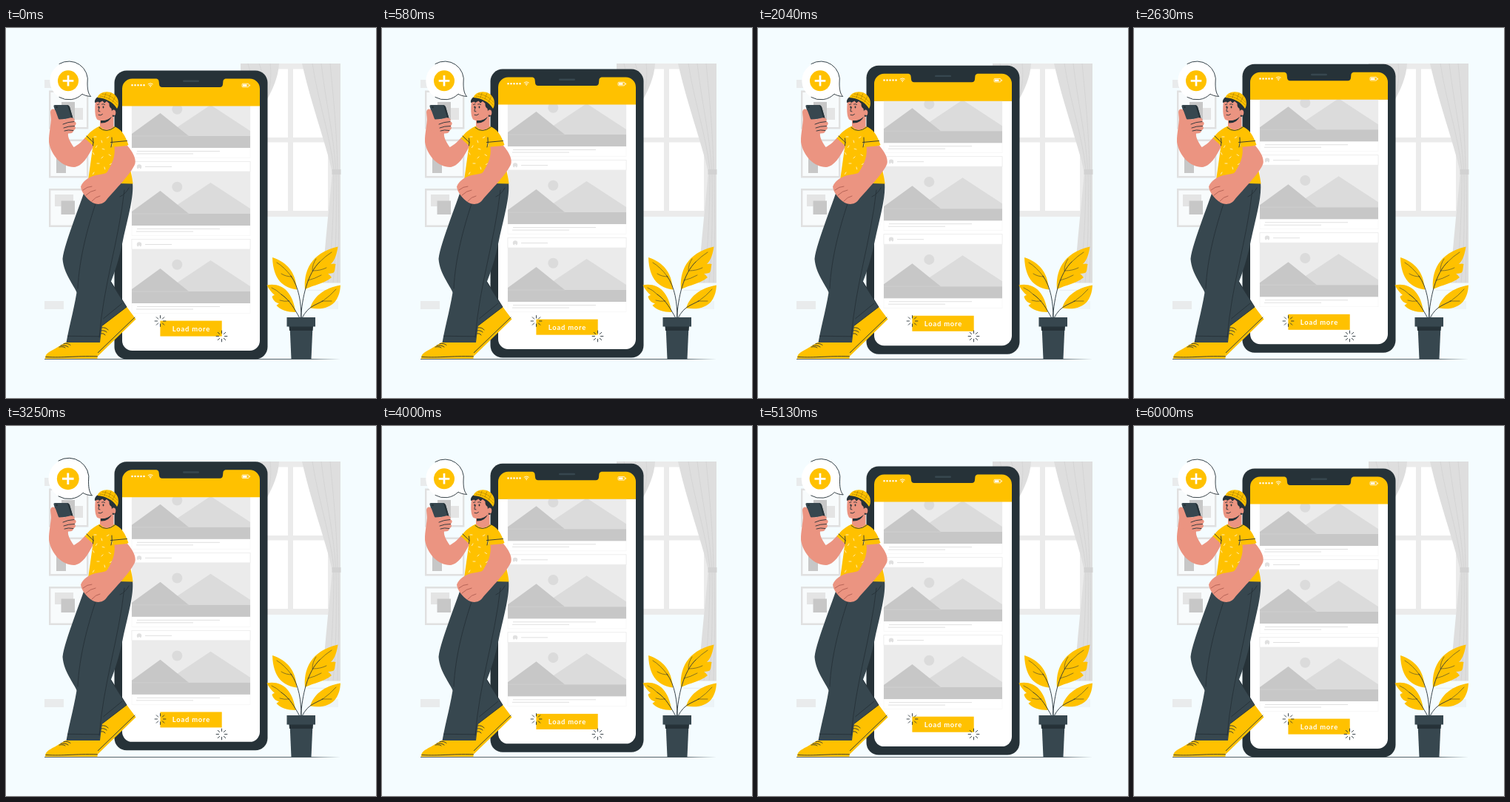
Animation, 500 px wide and 500 px high, one loop 6040 ms. Source, as an HTML page:

```html
<!DOCTYPE html>
<html lang="en">
<head>
<meta charset="utf-8">
<title>Load more</title>
<style>
  html, body { margin: 0; width: 100%; height: 100%; overflow: hidden; background: #f4fcff; }
  svg { display: block; width: 100vw; height: 100vh; }
  .line { fill: none; stroke: #263238; stroke-width: .9; stroke-linecap: round; stroke-linejoin: round; }
  .thin { stroke-width: .55; }
  .skin { fill: #eb9481; }
  .yellow { fill: #ffc100; }
  .slate { fill: #37474f; }
  .dark { fill: #263238; }
  .label { font: 700 9.4px Lato, "Open Sans", sans-serif; letter-spacing: .8px; fill: #fff; text-anchor: middle; }
</style>
</head>
<body>
<svg viewBox="0 0 500 500" xmlns="http://www.w3.org/2000/svg">
  <defs>
    <clipPath id="feedClip"><rect x="157" y="105" width="186" height="331"/></clipPath>
    <g id="post">
      <rect x="170" y="-13.5" width="160" height="100" fill="#fff" stroke="#f5f5f5" stroke-width=".7"/>
      <rect x="170" y="-13.5" width="160" height="13.5" fill="#fff" stroke="#ebebeb" stroke-width=".8"/>
      <circle cx="180" cy="-6.5" r="3.2" fill="#e0e0e0"/>
      <path d="M178.3-3.2q1.7-4 3.4 0z" fill="#fff"/>
      <path d="M188-6.5h36M177 77.5h112M176 81h77" stroke="#e0e0e0"/>
      <rect x="170" width="160" height="73" fill="#ebebeb"/>
      <circle cx="231.3" cy="20.7" r="7" fill="#dbdbdb"/>
      <path d="M224 57V50L276.5 15 330 50V57z" fill="#dbdbdb"/>
      <path d="M170 54L208.500 26 247 57H330V73H170z" fill="#c7c7c7"/>
      <path d="M170 57h77" stroke="#d2d2d2" stroke-width=".7"/>
    </g>
  </defs>

  <!-- Room -->
  <g>
    <path d="M52 70h14v11H52zM52 369h26v11H52z" fill="#e9ebec"/>
    <path d="M416 369h33v11h-33z" fill="#edf4f7"/>
    <path d="M408 354.300h27" stroke="#e6ecef"/>
    <path d="M59.200 85.700h51v49.500h-51zM59.200 151.700h51v49.500h-51zM59.200 218.200h51v49.500h-51z" fill="#f8fbfc" stroke="#e0e0e0" stroke-width="2.400"/>
    <path d="M89 108h15v16H89zM66 225h25v16H66zM80 165h12v15H80z" fill="#e4e4e4"/>
    <path d="M75 100h18v24H75zM68 165h13v31H68zM74.500 233.500H93V252H74.500z" fill="#c7c7c7"/>

    <path d="M317 48h135v8H441V255H317z" fill="#ebebeb"/>
    <path d="M340 55.500h41V148H340zM388 55.500h47V148H388zM340 154.500h41V247H340zM388 154.500h47V247H388z" fill="#fff"/>
    <path d="M317 48h52C368 66 361 82 351 100L317 130z" fill="#dedede"/>
    <path d="M327 48C333 70 336 90 335 115M342 48C349 66 350 84 347 108M357 48Q360 70 353 94" fill="none" stroke="#d2d2d2" stroke-width=".7"/>
    <path d="M400 48h52V344.500H428C430 300 437 240 441 195 432 155 413 105 400 48z" fill="#dedede"/>
    <path d="M414 48C422 100 438 145 443 191M426 48C432 100 443 145 445.500 191M438 48C443 100 447 140 448 191M443 198C443 250 440 305 435 344M446 198C447 250 446 305 442 344M449 198Q451 270 448 344" fill="none" stroke="#d0d0d0" stroke-width=".7"/>
    <rect x="440.500" y="191" width="12" height="7" fill="#d2d2d2"/>
  </g>
  <path d="M52 447.200H410L452 447.500 410 447.900H52z" class="dark"/>

  <!-- Phone -->
  <g id="phone">
    <rect x="146.500" y="57.500" width="207" height="390" rx="16.500" class="dark"/>
    <path d="M157 105H343V422.500A13.500 13.500 0 0 1 329.500 436H170.500A13.500 13.500 0 0 1 157 422.500z" fill="#fff"/>
    <g clip-path="url(#feedClip)">
      <use href="#post" y="89"/><use href="#post" y="194"/><use href="#post" y="299"/>
    </g>
    <path class="yellow" d="M157 105.500V82A13.500 13.500 0 0 1 170.500 68.500H202C205.500 68.500 206.500 70 206.700 73L207 76Q207.300 80 211 80H289Q292.700 80 293 76L293.300 73C293.500 70 294.500 68.500 298 68.500H329.500A13.500 13.500 0 0 1 343 82V105.500z"/>
    <rect x="239" y="70.500" width="22" height="2.400" rx="1.200" fill="#37474f"/>
    <path d="M170.500 77.200h17" stroke="#fff" stroke-width="2.500" stroke-linecap="round" stroke-dasharray="0 4"/>
    <path d="M191.800 76q3.400-2.600 6.800 0M193.200 77.600q2-1.500 4 0" fill="none" stroke="#fff" stroke-width=".9"/>
    <circle cx="195.200" cy="79" r=".8" fill="#fff"/>
    <rect x="319" y="75.200" width="9" height="4.600" rx="1" fill="none" stroke="#fff" stroke-width=".8"/>
    <path d="M320 76.200h5.500v2.600H320zM328.800 76.500h1v2h-1z" fill="#fff"/>
    <rect x="208.400" y="395.600" width="83.300" height="21" class="yellow"/>
    <text x="250.400" y="409.600" class="label">Load more</text>
  </g>
  <path id="bursts" class="line"/>

  <!-- Plant -->
  <g>
    <path class="yellow" d="M404 353C402 330 411 304 448.500 295.500 447 305 445 313 439 319Q443 318 445.500 319C444 326 445 329 442 331Q438 332 435 332 438 334 440 337C431 345 417 347 404 353z"/>
    <path class="yellow" d="M360 310C380 317 391 329 393 353.500 375 351 361 341 360 310z"/>
    <path class="yellow" d="M352.500 347.500C372 344 387 355 391.500 384 380 384 371 381 365.500 375Q367 373 369 372.500C364 371 361 368 359.500 363Q361 361 363 361 357 356 352.500 347.500z"/>
    <path class="yellow" d="M411 378.500C416 362 431 351 452 347.500 451 368 440 383 411 378.500z"/>
    <path class="line" d="M399 392C399 372 396 350 385 335M398.500 392C400 365 407 332 424 316M397 392C390 380 384 368 372 360M400 392Q406 380 416 375L428 369"/>
    <path class="line thin" d="M385 335Q376 323 366 317M424 316Q432 308 440 303M372 360Q366 354 359 351M428 369Q438 362 446 353M408 341Q417 339 426 334M415 328Q425 328 433 324M414 328Q414 319 419 312M386 336Q378 336 372 332M383 369Q376 370 370 368M427 369L440 369"/>
    <path d="M383.500 402h31l-2 45.500h-27z" class="slate"/>
    <path d="M382.500 403h32.500l-.5 6H383z" class="dark"/>
    <path d="M379.500 391H418v12.500H379.500z" class="slate"/>
  </g>

  <!-- Person -->
  <g>
    <path class="yellow" d="M162.500 376L175.500 393.500 124 443.500C123 430 125 414 129 403z"/>
    <path class="line" d="M174 391L124 439M129 405q6-1 9 3M128 409q5-1 8 2M128 413q4-1 6 2"/>
    <path class="slate" d="M110 208C104 230 79 290 76.500 312 78 332 91 346 97 360L128.500 403.500 163 377 141 341 135 240z"/>
    <path class="line" d="M141 342L163 377 129 403M157 372L130 394"/>
    <path class="yellow" d="M53 446.800C52.500 441 57 438 66 433.500L80 425H125L123.500 446.800z"/>
    <path class="line" d="M54 444.500C78 446 92 443 123.500 443.800M74 429q6-1 10 2M78 426.500q6-1 9 2M72 431q6-1 8 1"/>
    <path class="slate" d="M111 206L171 209C173 228 165 255 158 287 153 312 147 330 141 345 135 368 130 400 127 425H81.500C86 400 94 372 96.500 350 99 310 110 262 124 222z"/>
    <path class="line" d="M127 220C111 265 99 310 97 352M160 219C152 290 132 345 126 418M83.500 416.300L126 416.800M166 216Q162 224 154 228"/>

    <path class="skin" d="M61 112C62 128 57.500 142 58 154 61 173 76 188 92 188 103 187 111 174 119 158L107 148C101 155 96 159 91.500 161 87 154 83 148 84 142L77 121 68 110z"/>
    <path class="yellow" d="M127 132.500C118 136 111 143 106.500 149L117.500 159 110.500 209 171.500 210.500C170 194 163 176 161 160L165.500 158C162 147 156 136 146 133z"/>
    <path id="specks" stroke="#fff0b3" stroke-width="1" stroke-linecap="round"/>
    <path class="line" d="M126 134.500Q135 143 147 134M109 146l9.500 9M117.500 159q1-6 0-10M143 148q1 7-1 13M141.500 154.500L163.500 152.500"/>
    <path class="skin" d="M142 161L164 159C171 167 176 176 174.500 183 171 195 145 221 136 232 131 239 123 239 117 236 108 230 102 222 101 214.500 104 206 112 202 119 199.500 128 197 135 198 137 194 143 184 148 174 146.500 161z"/>
    <path class="line" style="stroke:#9f4f45;stroke-width:.7" d="M104 219q6-5 12-5M108 226q6-6 13-7M116 234q5-6 11-7"/>

    <path class="skin" d="M127 119V133Q136 142 145.500 133.500V114z"/>
    <path class="dark" d="M128 124.500Q136 126.500 143 119.500 139 129 128 128.500z"/>
    <path class="skin" d="M121 97C120 109 119.500 118 123 123.500 130 127.500 141 123 144 117L148 108 142 94z"/>
    <path class="dark" d="M120 101C119 94 127 90 135 92L150 106 147.500 119 144 120 142.500 109Q139 107 139.500 102L136 99 133 101.500 130.500 98.500 126 101 124.500 99.500z"/>
    <ellipse class="skin" cx="145.500" cy="114.500" rx="2.800" ry="4"/>
    <path class="yellow" d="M123.500 94C126 85 145 82 151 96 152.500 101 152 106 150 109 144 99 134 95 123.500 94z"/>
    <path class="line" style="stroke:#8d6d05;stroke-width:.6;stroke-dasharray:1.500 1.300" d="M127 92Q142 94 151 105M130 89Q144 91 151 101M133 94L135 88M139 96L142 88M144 100L148 92"/>
    <path class="line" d="M123.500 103.500l2.500-.8M129.500 103q2-1 4 .5M126.500 107q-2 4-1.500 5.500l2 .3M125 117.500q3 1.500 5.500-1"/>
    <ellipse class="dark" cx="125.300" cy="107" rx=".9" ry="1.400"/>
    <ellipse class="dark" cx="131.500" cy="107" rx=".9" ry="1.400"/>
    <circle class="dark" cx="145" cy="118.500" r="1"/>

    <path class="slate" d="M66 104H82.500Q85 104 86 106.500L90.500 122 72 123.500Q70 123.500 69.300 121L64.500 106Q64 104 66 104z"/>
    <path class="dark" d="M82.500 104Q85 104 86 106.500L90.500 122H88.500L83.500 106z"/>
    <circle cx="68.500" cy="107" r="1.300" class="dark"/>
    <path class="skin" d="M60 114C60 109 65 108 67 112L71 123Q72 125.500 75 124.500L86 121.500C92 120 94 124 92 126.500 96 127 95 131 92.500 132.500 95 134 94 137.500 91 138.500 91 142 88 142.500 84 142.500L75 147 62 135z"/>
    <path class="line" d="M92 126.500Q83 127 77 130M92.500 132.500Q84 132.500 78 135M91 138.500Q84 137 79 139"/>
  </g>

  <!-- Speech bubble -->
  <g id="bubble">
    <path d="M110 75C110 84 111.500 89.500 114.700 92.500 109 92 106 91 103 89.200A25.500 25.500 0 1 1 110 75z" fill="#fff"/>
    <path class="line" d="M72 48.500A25.500 25.500 0 0 1 110 75C110 84 111.500 89.500 114.700 92.500 109 92 106 91 103 89.200A25.500 25.500 0 0 1 72 93.500"/>
    <circle cx="84" cy="71.300" r="14" class="yellow"/>
    <path d="M76.700 71.300h14.600M84 64v14.600" stroke="#fff" stroke-width="2.700"/>
  </g>
</svg>
<script>
  const LOOP = 6040, FLOAT = 6000, BEAT = 1500, LIFT = 10;
  const BUBBLE_CENTER = [87.2, 71.2];
  const beatKeys = [[0, 1], [.1, 1.1], [.3, 1], [.4, 1], [.5, 1.1], [.6, 1], [1, 1]];
  const byId = id => document.getElementById(id);
  const phone = byId("phone"), bubble = byId("bubble");

  function burst(cx, cy, rays = 8) {
    let d = "";
    for (let i = 0; i < rays; i++) {
      const a = i / rays * 2 * Math.PI, x = Math.cos(a), y = Math.sin(a);
      d += `M${cx + 4 * x} ${cy + 4 * y}L${cx + 7.4 * x} ${cy + 7.4 * y}`;
    }
    return d;
  }

  function speckles() {
    let d = "";
    for (let row = 0; row < 5; row++)
      for (let col = 0; col < 3; col++) {
        const x = 119 + col * 10 + (row % 2) * 4, y = 147 + row * 12 + (col % 2) * 5;
        const a = row * 2.1 + col * 1.3;
        d += `M${x} ${y}l${3 * Math.cos(a)} ${3 * Math.sin(a)}`;
      }
    return d;
  }

  function interpolate(keys, p) {
    const i = keys.findIndex(([at]) => at > p);
    const [a, from] = keys[i - 1], [b, to] = keys[i];
    return from + (to - from) * (p - a) / (b - a);
  }

  function draw(time) {
    const t = Math.min(time % LOOP, FLOAT);
    const lift = LIFT * (1 - Math.abs(1 - 2 * t / FLOAT));
    phone.setAttribute("transform", `translate(0 ${-lift})`);
    const s = interpolate(beatKeys, t % BEAT / BEAT);
    const [x, y] = BUBBLE_CENTER;
    bubble.setAttribute("transform", `translate(${x} ${y}) scale(${s}) translate(${-x} ${-y})`);
  }

  byId("bursts").setAttribute("d", burst(208.5, 396) + burst(291.5, 416.5));
  byId("specks").setAttribute("d", speckles());

  const start = performance.now();
  function tick() {
    draw(performance.now() - start);
    requestAnimationFrame(tick);
  }
  tick();
</script>
</body>
</html>
```
